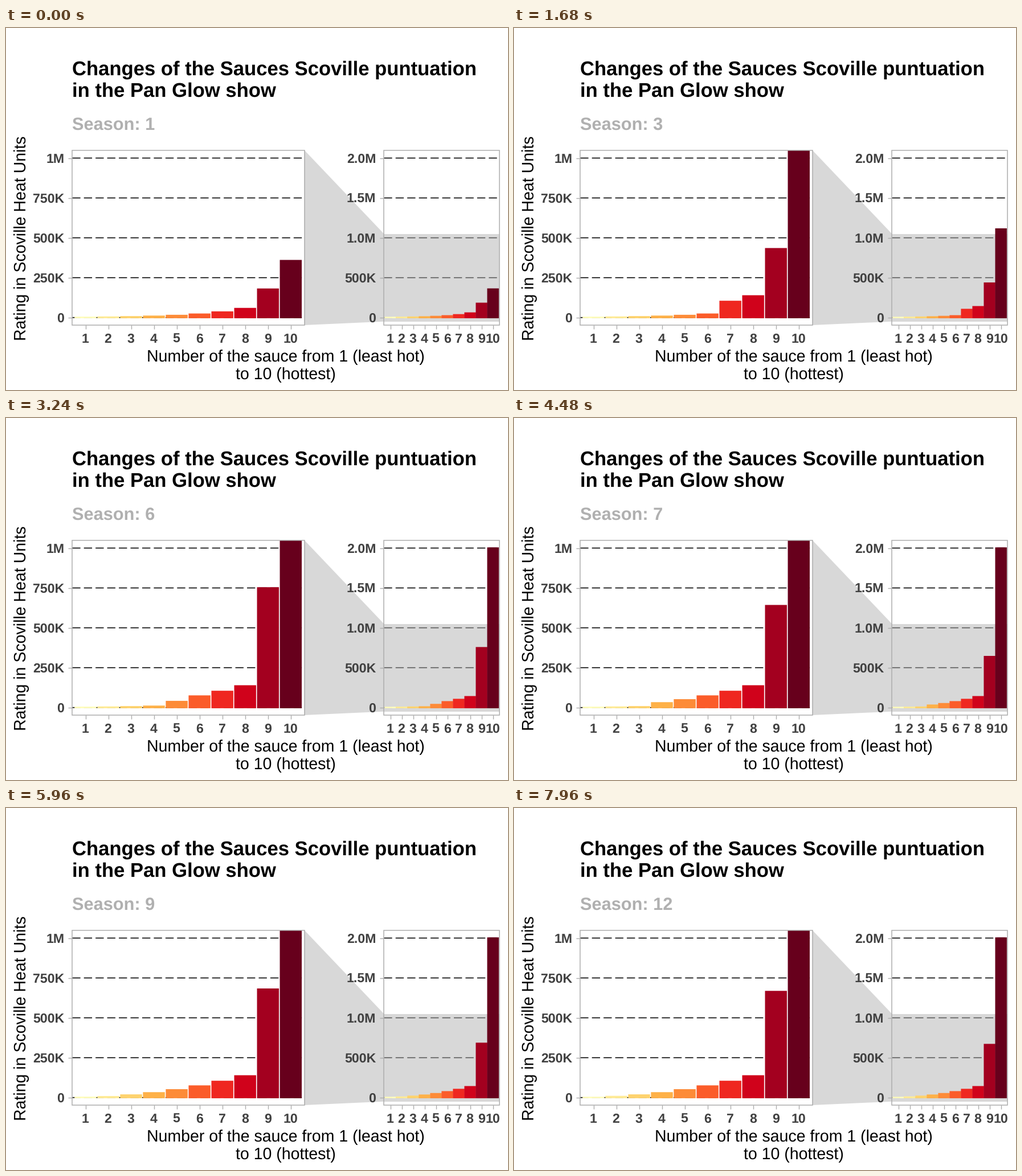
Recreate the animation shown at these times as a matplotlib script. Size 881 by 636 pixels, loop 8 s.

```python
import numpy as np
import matplotlib.pyplot as plt
from matplotlib.animation import FuncAnimation
from matplotlib.patches import Polygon, Rectangle

W, H, DPI = 881, 636, 64
PT = 72 / DPI            # points per pixel
FRAMES, STEP = 200, 40
PER_SEASON = 17.6        # frames from one season to the next

plt.rcParams["font.family"] = "Liberation Sans"
plt.rcParams["text.hinting"] = "none"

TOP, BOTTOM, BASE = 214.5, 522, 508.7
GRID = 70.05             # pixels between grid lines
INK, FRAME_GREY = "#404040", "#adadad"
COLORS = ["#fffdbe", "#ffeb97", "#fed36e", "#feb148", "#fd8b38",
          "#fb5c2a", "#ef2720", "#d0021b", "#a3001f", "#67001c"]

fig = plt.figure(figsize=(W / DPI, H / DPI), dpi=DPI, facecolor="white")
ax = fig.add_axes([0, 0, 1, 1])
ax.set_xlim(0, W)
ax.set_ylim(H, 0)
ax.axis("off")


def heats(season):
    """Heat of the ten sauces, in thousands, at a fractional season."""
    # Mild sauces step up one after another, the hotter ones first
    i = np.arange(1, 9)
    early = 3 * 1.63 ** (i - 2)
    late = 135.6 * (i / 8) ** 2.2
    step = np.clip(season - 1 - 1.3 * (8 - i), 0, 1)
    mild = early + (late - early) * step
    ninth = np.interp(season, [1, 2, 3, 4, 6, 7, 10, 13],
                      [178, 357, 357, 550, 800, 632, 690, 657])
    tenth = np.interp(season, [1, 2, 3, 4], [357, 550, 550, 2000])
    return [*mild, ninth, tenth]


def text(x, y, s, size, color="black", weight="bold", ha="left", **kw):
    return ax.text(x, y, s, fontsize=size * PT, color=color, weight=weight,
                   ha=ha, va="baseline", zorder=8, **kw)


def line(xs, ys, color, width, z, **kw):
    ax.plot(xs, ys, color=color, lw=width * PT, zorder=z,
            solid_capstyle="butt", dash_capstyle="butt", **kw)


class Panel:
    EDGE = 1.2           # bar outline beyond the bar itself
    DASH = 1.6           # grid line width

    def __init__(self, left, right, first, pitch, grid_step, labels):
        self.per_k = GRID / grid_step
        frame = Rectangle((left, TOP), right - left, BOTTOM - TOP,
                          fc="none", ec=FRAME_GREY, lw=1.5 * PT, zorder=6)
        ax.add_patch(frame)
        for i, label in enumerate(labels):
            y = BASE - GRID * i
            line([left, right], [y, y], "black", self.DASH, 2, snap=False,
                 linestyle=(0, (14.3 / self.DASH, 6.15 / self.DASH)))
            line([left - 7, left], [y, y], FRAME_GREY, 1.4, 5)
            text(left - 14, y + 8.3, label, 23.1, INK, ha="right")
        self.bars = []
        half = .45 * pitch + self.EDGE
        for i, color in enumerate(COLORS):
            x = first + i * pitch
            line([x, x], [BOTTOM, BOTTOM + 7], FRAME_GREY, 1.4, 5)
            text(x - .5, 553, str(i + 1), 23.1, INK, ha="center")
            bar = Rectangle((x - half, BASE), 2 * half, 1, fc=color, lw=0,
                            zorder=4, snap=False)
            ax.add_patch(bar)
            bar.set_clip_path(frame)
            self.bars.append(bar)

    def show(self, values):
        for bar, v in zip(self.bars, values):
            h = v * self.per_k
            bar.set_y(BASE - h - self.EDGE)
            bar.set_height(h + 2 * self.EDGE)


panels = [
    Panel(116.3, 523.5, 139.5, 40.03, 250,
          ["0", "250K", "500K", "750K", "1M"]),
    Panel(663.3, 866, 674.5, 20.02, 500,
          ["0", "500K", "1.0M", "1.5M", "2.0M"]),
]

# Zoom wedge and the band it opens into
band_top, band_end = BASE - 2.1 * GRID, BASE + .1 * GRID
shade = dict(fc="#b3b3b3", alpha=.5, lw=0, zorder=3)
ax.add_patch(Polygon([(523.5, TOP), (663.3, band_top), (663.3, band_end),
                      (523.5, BOTTOM)], **shade))
ax.add_patch(Rectangle((663.3, band_top), 202.7, band_end - band_top,
                       **shade))

text(116, 83, "Changes of the Sauces Scoville puntuation", 34.6)
text(116, 121, "in the Pan Glow show", 34.6)
season_label = text(116, 179, "", 30.7, "#b0b0b0")
axis_title = dict(size=28.55, weight="normal", ha="center")
text(491, 586, "Number of the sauce from 1 (least hot)", **axis_title)
text(491, 617, "to 10 (hottest)", **axis_title)
text(35, 369, "Rating in Scoville Heat Units", rotation=90,
     rotation_mode="anchor", **axis_title)


def draw(frame):
    season = 1 + frame / PER_SEASON
    values = heats(season)
    for panel in panels:
        panel.show(values)
    season_label.set_text(f"Season: {int(season + .5)}")
    return []


anim = FuncAnimation(fig, draw, frames=FRAMES, interval=STEP, repeat=True,
                     repeat_delay=0, init_func=lambda: draw(0))
plt.show()
```
